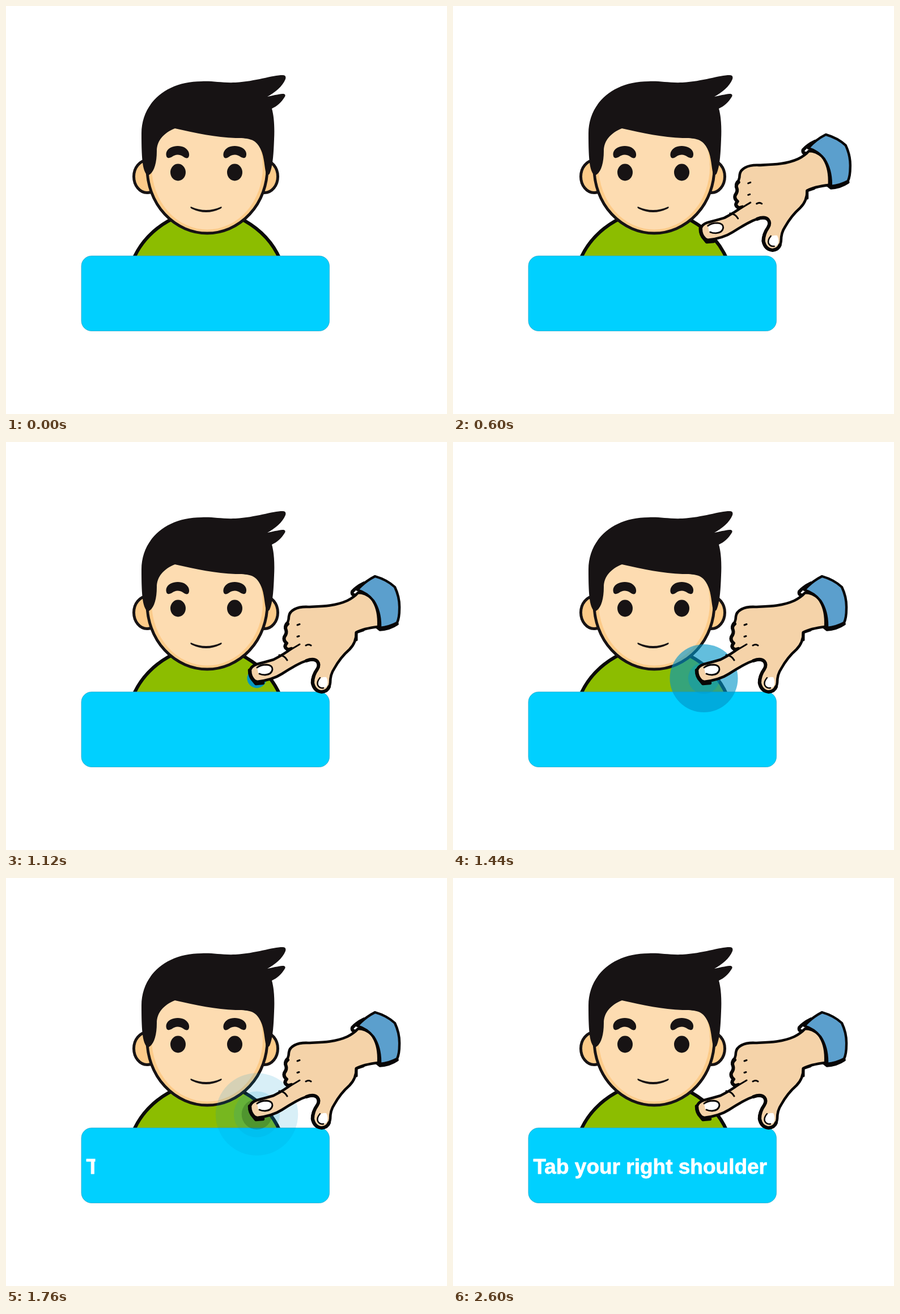
Recreate the animation shown at these times as an HTML page. Size 778 by 720 pixels, loop 4.8 s.

```html
<!DOCTYPE html>
<html lang="en">
<head>
<meta charset="utf-8">
<title>Right shoulder</title>
<style>
  html, body { margin: 0; width: 100%; height: 100%; overflow: hidden; background: #fff; }
  svg { display: block; width: 100vw; height: 100vh; }
  text { font: bold 37px "Liberation Sans", Arial, sans-serif; }
</style>
</head>
<body>
<svg viewBox="0 0 778 720">
  <defs>
    <clipPath id="wipe"><rect id="wipeRect" x="133" y="441" width="0" height="132"/></clipPath>
    <path id="brow" d="M283 265C280 255 290 247 303 247C317 247 324 256 323 264C322 270 317 269 313 266C305 261 299 262 293 266C288 269 284 269 283 265Z"/>
  </defs>

  <!-- boy -->
  <g fill="#171314" stroke-linejoin="round">
    <path d="M217 470A141 141 0 0 1 491 470Z" fill="#8cbd00" stroke="#0b0a0a" stroke-width="6"/>
    <g fill="#fdcb89" stroke="#171314" stroke-width="5">
      <ellipse cx="249" cy="301" rx="23.5" ry="28.5"/>
      <ellipse cx="456" cy="301" rx="23.5" ry="28.5"/>
      <ellipse cx="355" cy="286" rx="106" ry="115"/>
    </g>
    <ellipse cx="355" cy="284" rx="98" ry="110.5" fill="#fddcb1"/>
    <path d="M250 299C241 292 239 272 239 225C239 172 282 133 345 133C365 132 380 136 405 135C440 133 470 122 488 122Q495 122 493 129C488 142 474 153 461 160C475 157 484 155 490 155Q494 156 492 160C486 170 478 177 469 181C473 195 474 215 473 235C472 265 470 285 465 296Q462 300 459 297C455 280 456 262 446 247C438 234 425 233 405 233C370 232 335 224 298 216C278 224 266 238 266 256C266 280 260 296 250 299Z"/>
    <use href="#brow"/>
    <use href="#brow" transform="matrix(-1 0 0 1 706.5 0)"/>
    <ellipse cx="303.5" cy="293.5" rx="13.5" ry="15"/>
    <ellipse cx="403.5" cy="293.5" rx="13.5" ry="15"/>
    <path d="M326 354Q353 366 380 354Q382 356 378 358Q353 370 328 358Q324 356 326 354Z"/>
  </g>

  <!-- caption box -->
  <rect x="133" y="441" width="437.5" height="132.5" rx="18" fill="#00d0ff" stroke="#2ba9c9" stroke-width=".8"/>
  <g clip-path="url(#wipe)">
    <text x="141.5" y="521.5" fill="#fff" stroke="#fff" stroke-width=".8" stroke-linejoin="round">Tab your right shoulder</text>
  </g>

  <g id="rings"></g>

  <!-- hand -->
  <g id="hand" fill="none" stroke="#080606" stroke-linecap="round" stroke-linejoin="round">
    <path d="M618 270Q609 271 611 264Q619 255 632 249" stroke-width="6"/>
    <path d="M621 266Q614 274 602 280C580 290 555 290 533 291C512 290 500 298 499 308Q499 313 497 318Q490 324 494 332Q496 337 492 343Q488 350 495 355Q488 362 497 366L504 364Q490 375 472 384Q455 389 443 392Q429 396 430 409Q432 420 443 423Q470 420 487 409Q507 396 522 389Q540 381 549 387Q554 393 549 401Q540 413 540 425Q543 440 557 441Q570 440 572 425Q572 410 579 400Q590 380 606 366Q618 354 618 336Q630 329 657 326Q659 295 645 276Q634 266 621 266Z" fill="#f5d3a9" stroke-width="4.6"/>
    <path d="M497 321Q491 326 494 332Q496 337 491 344Q489 350 495 355Q489 362 497 366" stroke-width="6"/>
    <path d="M430 403Q430 414 437 421L441 426L453 425" stroke-width="6.5"/>
    <path d="M530 386Q543 381 549 387Q554 393 549 401Q541 412 541 425Q544 440 557 441Q567 440 570 432" stroke-width="6"/>
    <path d="M618 349L618 336L630 332" stroke-width="5"/>
    <path d="M472 384Q488 375 518 357M482 376Q492 377 496 385M514 323L518 321.500M514 343.500L517 342.500M529 359Q534 356 538 359" stroke-width="3"/>
    <path d="M443 398Q449 393 460 393Q470 394 470 401Q469 410 457 411Q449 411 445 408Z" fill="#fff" stroke="none"/>
    <path d="M443 398Q449 393 460 393Q470 394 470 401Q469 410 457 411Q451 411 447 409" stroke-width="2.8"/>
    <path d="M551 420Q556 414 565 415Q569 422 566 431Q560 437 552 432Q548 427 551 420Z" fill="#fff" stroke="none"/>
    <path d="M554 416Q548 423 550 429Q553 435 560 434" stroke-width="2.5"/>
    <path d="M620 261Q633 246 651 237Q672 243 686 256Q695 275 694 295Q694 310 690 319Q675 327 660 328Q661 300 648 280Q637 266 620 261Z" fill="#5b9fcd" stroke-width="4.4"/>
    <path d="M655 327L660 331Q677 330 690 321" stroke-width="5.500"/>
  </g>
</svg>
<script>
  const LOOP = 4800, STEP = 40, LAST = 2600;
  const $ = id => document.getElementById(id);
  const clamp = v => Math.max(0, Math.min(1, v));
  const easeInOut = x => x < .5 ? 2 * x * x : 1 - 2 * (1 - x) ** 2;

  const rings = [
    { start: 1055, size: 78, alpha: 1, life: 800, color: '#0096c8' },
    { start: 1200, size: 46, alpha: .5, life: 740, color: '#0096c8' },
    { start: 1440, size: 38, alpha: .55, life: 560, color: '#1c4a18' }
  ];
  for (const ring of rings) {
    ring.el = document.createElementNS('http://www.w3.org/2000/svg', 'circle');
    ring.el.setAttribute('cx', 442.5);
    ring.el.setAttribute('cy', 417);
    ring.el.setAttribute('fill', ring.color);
    $('rings').append(ring.el);
  }

  function draw(t) {
    const away = 1 - easeInOut(clamp((t - 40) / 920));
    $('hand').setAttribute('visibility', t < 40 ? 'hidden' : 'visible');
    $('hand').setAttribute('transform', `translate(${22 * away} ${-33 * away})`);

    for (const { el, start, size, alpha, life } of rings) {
      const age = Math.max(0, t - start);
      el.setAttribute('r', size * (1 - Math.exp(-age / 262)));
      el.setAttribute('opacity', alpha * (1 - clamp(age / life) ** 1.3));
    }

    // the caption is wiped in from the left
    const edge = t < 1740 ? 133 : 157.5 + (t - 1760) * .485;
    $('wipeRect').setAttribute('width', Math.min(437, edge - 133));
  }

  const begin = performance.now();
  function tick() {
    const t = (performance.now() - begin) % LOOP;
    draw(Math.min(LAST, Math.floor(t / STEP) * STEP));
    requestAnimationFrame(tick);
  }
  tick();
</script>
</body>
</html>
```
